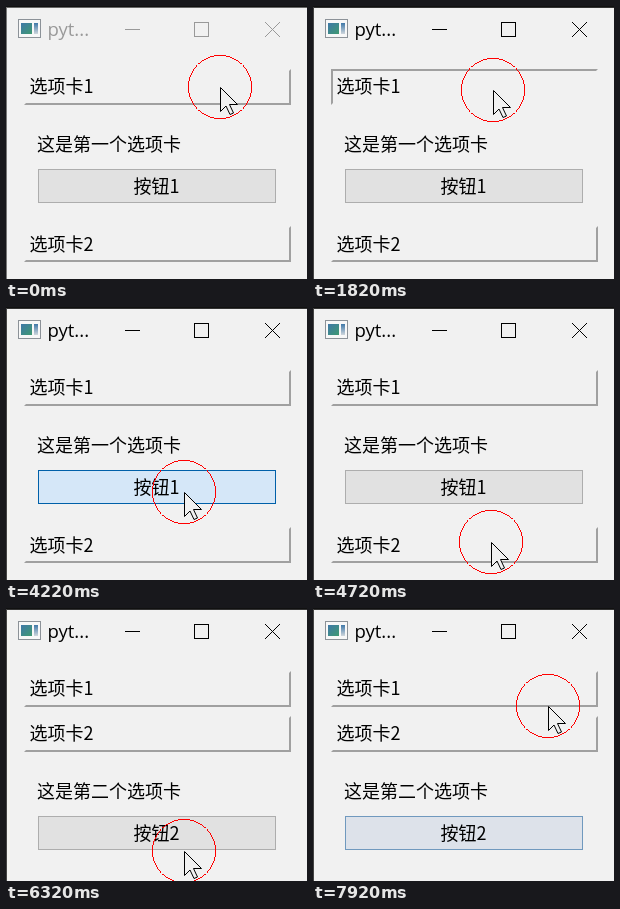
Write an HTML page with a canvas that moves like this. It is 301 by 273 pixels and loops after 8 s.

```html
<!DOCTYPE html>
<html lang="zh-CN">
<head>
<meta charset="utf-8">
<title>选项卡</title>
<style>
html, body { margin: 0; width: 100%; height: 100%; overflow: hidden; background: #f1f1f1; }
canvas { display: block; }
</style>
</head>
<body>
<canvas id="stage" width="301" height="273"></canvas>
<script>
const ctx = document.getElementById('stage').getContext('2d');
const LOOP = 8000;
const FACE = '#f1f1f1';
const SHADOW = '#a0a0a0';
const CJK = '18px "Noto Sans CJK SC", "Noto Sans CJK", "Noto Sans CJK JP", sans-serif';
const LATIN = '18.5px "Open Sans", "Noto Sans", sans-serif';

// Pointer legs: time of first step, number of steps, end x, end y, step interval
const legs = [
  [100, 2, 199, 68, 120],
  [420, 5, 180, 84, 100],
  [2620, 5, 198, 142, 100],
  [3120, 4, 178, 185, 100],
  [4420, 5, 178, 248, 100],
  [6320, 6, 176, 215, 100],
  [7720, 3, 235, 98, 100]
];

// Push button looks: time, fill, border
const looks = [
  [0, '#e1e1e1', '#adadad'],
  [3220, '#e3e9ee', '#5795c2'],
  [3320, '#e5f1fb', '#0078d7'],
  [3620, '#cce4f7', '#005499'],
  [4220, '#d5e7f8', '#0060a9'],
  [4420, '#e5f1fb', '#0078d7'],
  [4520, '#e3e9ee', '#5795c2'],
  [4620, '#e1e1e1', '#adadad'],
  [6420, '#e3e9ee', '#5795c2'],
  [6520, '#e5f1fb', '#0078d7'],
  [7420, '#cce4f7', '#005499'],
  [7620, '#d5e7f8', '#0060a9'],
  [7720, '#d6e5f3', '#2874ac'],
  [7820, '#d9e3ee', '#4f8ab6'],
  [7920, '#dde2ea', '#7099be']
];

function pointerAt(t) {
  let x = 214, y = 81;
  for (const [start, steps, endX, endY, interval] of legs) {
    if (t < start) break;
    const p = Math.min(steps, Math.floor((t - start) / interval) + 1) / steps;
    x += (endX - x) * p;
    y += (endY - y) * p;
  }
  return [Math.round(x), Math.round(y)];
}

function rect(x, y, w, h, color) {
  ctx.fillStyle = color;
  ctx.fillRect(x, y, w, h);
}

function text(str, x, baseline, font = CJK, color = '#000') {
  ctx.font = font;
  ctx.fillStyle = color;
  ctx.fillText(str, x, baseline);
}

function polygon(points) {
  ctx.beginPath();
  points.forEach(([x, y]) => ctx.lineTo(x, y));
  ctx.closePath();
}

// One-pixel ring without antialiasing
function pixelRing(x, y, radius, color) {
  for (let d = 0.5 - Math.ceil(radius); d < radius; d++) {
    const e = Math.sqrt(radius * radius - d * d);
    if (e < Math.abs(d)) continue;
    for (const side of [-e, e]) {
      rect(Math.floor(x + d), Math.floor(y + side), 1, 1, color);
      rect(Math.floor(x + side), Math.floor(y + d), 1, 1, color);
    }
  }
}

function drawIcon() {
  rect(12, 13, 23, 19, '#8c9298');
  rect(13, 14, 21, 17, '#f8f8f8');
  const picture = ctx.createLinearGradient(15, 17, 26, 28);
  picture.addColorStop(0, '#3f78a8');
  picture.addColorStop(1, '#3f9a72');
  rect(15, 17, 11, 11, picture);
  const strip = ctx.createLinearGradient(0, 17, 0, 28);
  strip.addColorStop(0, '#3f78a8');
  strip.addColorStop(1, '#cfd6dc');
  rect(28, 17, 4, 11, strip);
}

function drawTitleBar(active) {
  const ink = active ? '#000' : '#999';
  rect(0, 0, 301, 1, '#111');
  rect(0, 1, 301, 1, active ? '#333' : '#666');
  rect(0, 1, 1, 272, active ? '#444' : '#777');
  drawIcon();
  text('pyt...', 41.5, 30, LATIN, ink);
  ctx.strokeStyle = ink;
  ctx.lineWidth = 1;
  ctx.strokeRect(188.5, 16.5, 14, 14);
  ctx.beginPath();
  ctx.moveTo(119, 23.5);
  ctx.lineTo(134, 23.5);
  ctx.moveTo(259, 16);
  ctx.lineTo(274, 31);
  ctx.moveTo(274, 16);
  ctx.lineTo(259, 31);
  ctx.stroke();
}

// The shadow lies bottom right when raised, top left when pressed
function drawTab(label, y, baseline, pressed) {
  const left = 18, right = 285, bottom = y + 36;
  const corner = pressed ? [left, y] : [right, bottom];
  const inner = pressed ? [left + 2, y + 2] : [right - 2, bottom - 2];
  polygon([[left, bottom], corner, [right, y], [right - 2, y + 2],
           inner, [left + 2, bottom - 2]]);
  ctx.fillStyle = SHADOW;
  ctx.fill();
  text(label, 23.5, baseline);
}

function drawPage(message, caption, baseline, t) {
  const [, fill, border] = looks.filter(look => look[0] <= t).pop();
  text(message, 31, baseline);
  rect(32, baseline + 18, 238, 34, border);
  rect(33, baseline + 19, 236, 32, fill);
  text(caption, 127.5, baseline + 42);
}

function drawPointer(x, y) {
  pixelRing(x, y, 31.5, '#f00');
  ctx.save();
  ctx.translate(x + 0.5, y + 0.5);
  polygon([[0, 0], [0, 24], [5.5, 18.5], [9.5, 27], [13, 25.5], [9, 17], [17, 17]]);
  ctx.fillStyle = FACE;
  ctx.fill();
  ctx.strokeStyle = '#000';
  ctx.lineWidth = 1;
  ctx.stroke();
  ctx.restore();
}

function draw(t) {
  const secondPage = t >= 5820;
  const secondTab = secondPage ? [108, 132] : [220, 245];
  rect(0, 0, 301, 273, FACE);
  drawTitleBar(t >= 1820);
  drawTab('选项卡1', 63, 87, t >= 1820 && t < 2020);
  drawTab('选项卡2', ...secondTab, t >= 5620 && t < 5820);
  if (secondPage) drawPage('这是第二个选项卡', '按钮2', 190, t);
  else drawPage('这是第一个选项卡', '按钮1', 145, t);
  drawPointer(...pointerAt(t));
}

const begin = performance.now();
function tick() {
  draw((performance.now() - begin) % LOOP);
  requestAnimationFrame(tick);
}
tick();
</script>
</body>
</html>
```
